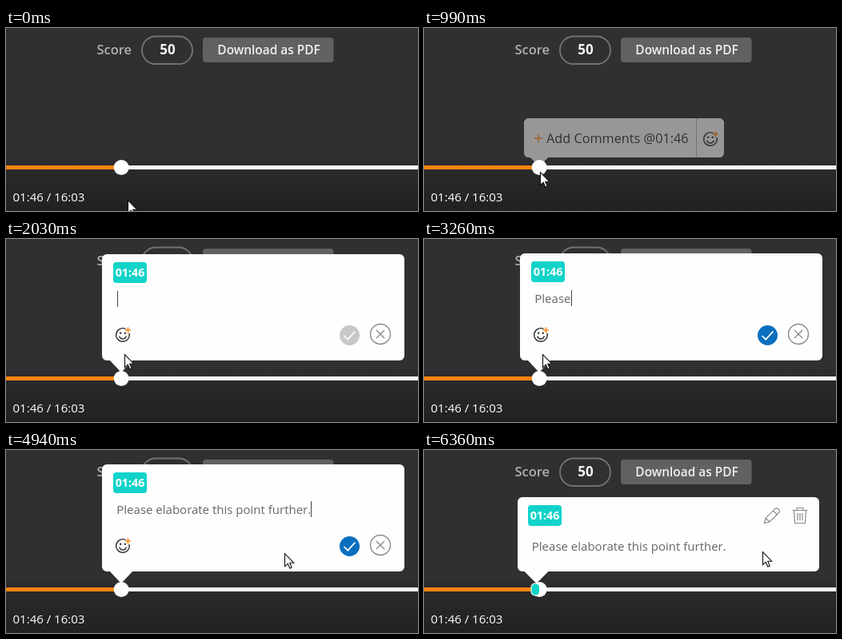
Animation of 515 by 229 pixels, one loop 6.44 s. Source, as an HTML page with a canvas:

```html
<!DOCTYPE html>
<html lang="en">
<head>
<meta charset="utf-8">
<title>Timed comment</title>
<style>
  html, body { margin: 0; height: 100%; overflow: hidden; background: #312f30; }
  canvas { display: block; }
</style>
</head>
<body>
<canvas width="515" height="229"></canvas>
<script>
const ctx = document.querySelector('canvas').getContext('2d');
const LOOP = 6440;
const OPEN = 1960, TYPE = 3020, HOVER = 5160, FOCUS = 5540, SAVE = 5770;
const MESSAGE = 'Please elaborate this point further.';
const ORANGE = '#ff8412', TEAL = '#12d3c9', PAPER = '#fefefe', GREY = '#8a8a8a';

const ARROW = new Path2D('M.5.5V16.6L4.2 13.1 6.8 19 9.2 18 6.7 12.2H11.7Z');
const HAND = new Path2D('M6 15V2.4a1.7 1.7 0 0 1 3.4 0V8.5q2-1 3 .7 2-.6 2.8.9 2-.3 2.3 1.6V16q0 3-2 5v2.5H7.5V21L2 14.5q-1-2 .8-2.5 1.6 0 3.2 3Z');

const progress = (t, from, to) => Math.min(1, Math.max(0, (t - from) / (to - from)));

function ease(t, from, to) {
  const p = progress(t, from, to);
  return p * p * (3 - 2 * p);
}

function box(x, y, w, h, r, fill) {
  ctx.beginPath();
  ctx.roundRect(x, y, w, h, r);
  ctx.fillStyle = fill;
  ctx.fill();
}

function disc(x, y, r, fill) {
  box(x - r, y - r, 2 * r, 2 * r, r, fill);
}

function outline(x, y, w, h, r, color, width) {
  ctx.beginPath();
  ctx.roundRect(x, y, w, h, r);
  ctx.strokeStyle = color;
  ctx.lineWidth = width;
  ctx.stroke();
}

// Strokes an SVG path placed at x, y
function line(d, x, y, color, width = 1.2) {
  ctx.save();
  ctx.translate(x, y);
  ctx.strokeStyle = color;
  ctx.lineWidth = width;
  ctx.stroke(new Path2D(d));
  ctx.restore();
}

function text(s, x, y, size, color, weight = 400, align = 'left') {
  ctx.font = `${weight} ${size}px "Open Sans", sans-serif`;
  ctx.textAlign = align;
  ctx.fillStyle = color;
  ctx.fillText(s, x, y);
}

// Rounded panel with a tail that points at tipX, tipY
function bubble(x, y, w, h, tipX, tipY, half, fill) {
  ctx.beginPath();
  ctx.roundRect(x, y, w, h, 6);
  ctx.moveTo(tipX - half, y + h - 1);
  ctx.lineTo(tipX + half, y + h - 1);
  ctx.lineTo(tipX, tipY);
  ctx.closePath();
  ctx.fillStyle = fill;
  ctx.fill();
}

function smiley(x, y) {
  line('M3.5-7.5A8.3 8.3 0 1 0 8-2M-4.3 1.5A4.4 4.4 0 0 0 4.3 1.5', x, y, '#333', 1.4);
  for (const side of [-1, 1]) disc(x + side * 2.8, y - 2.3, 1.2, '#333');
  line('M0-3.5v7M-3.5 0h7', x + 6.5, y - 6, ORANGE, 1.6);
}

function badge(x, y) {
  box(x, y, 42, 26, 4, TEAL);
  text('01:46', x + 21, y + 18, 14.3, '#fff', 700, 'center');
}

function player() {
  ctx.fillStyle = '#312f30';
  ctx.fillRect(0, 0, 515, 229);
  const shade = ctx.createLinearGradient(0, 164, 0, 229);
  shade.addColorStop(0, '#2f2d2f');
  shade.addColorStop(0.2, '#2b2a2b');
  shade.addColorStop(1, '#212121');
  ctx.fillStyle = shade;
  ctx.fillRect(0, 164, 515, 65);

  text('Score', 113.5, 33, 16.5, '#b0afb0', 600);
  outline(170, 10.5, 63, 34.5, 17, '#747273', 1.8);
  text('50', 202, 33, 17, '#f2f2f2', 700, 'center');
  box(246, 12, 163.5, 31, 4, '#626162');
  text('Download as PDF', 328.5, 33.3, 15.4, '#f0f0f0', 600, 'center');

  box(0, 172, 515, 5, 0, '#fbf5fb');
  box(0, 172, 144, 5, 0, ORANGE);
  text('01:46 / 16:03', 8.5, 217, 15, '#fff', 500);
}

function tooltip(opacity) {
  const panel = fill => bubble(125, 113, 250, 49, 144, 173, 12, fill);
  panel('#f5f5f6');
  line('M-5 0h10M0-5v10', 143, 138, ORANGE, 1.3);
  text('Add Comments @01:46', 153, 144, 16.25, '#333');
  line('M0 0v49', 340.5, 113, '#a9acb8', 1);
  smiley(358, 139);
  // Fading the panel as one layer keeps its text dark
  panel(`rgba(49, 47, 48, ${1 - opacity})`);
}

function focusFrame() {
  ctx.setLineDash([4, 4]);
  for (const color of ['#4fc04f', '#b070b8']) {
    outline(413, 100, 33, 42, 0, color, 1.6);
    ctx.lineDashOffset = 4;
  }
  ctx.setLineDash([]);
  ctx.lineDashOffset = 0;
}

function editor(t) {
  const typing = t >= TYPE, top = typing ? 18 : 19;
  bubble(120, top, 378, 152 - top, 144, 167, 15, PAPER);
  badge(134, top + 10);

  const count = 13 * progress(t, 2970, 3560) + 23 * progress(t, 3600, 4210);
  const typed = MESSAGE.slice(0, typing ? Math.floor(count) : 0);
  text(typed, 138.3, 80, 15, '#666');
  line('M0 0v20', Math.round(138.6 + ctx.measureText(typed).width) + 0.5, top + 46, '#444', 1);

  smiley(146, 120);
  disc(429.5, 120.5, 12.5, typing ? '#0a6fbf' : '#c8c8c8');
  line('M-7 .5l4.7 4.7 9.3-10', 429.5, 120.5, '#fff', 1.7);
  outline(455.5, 106.5, 25, 25, 12.5, GREY, 1.4);
  line('M-5-5L5 5M5-5L-5 5', 468, 119, GREY, 1.4);
  if (t >= FOCUS) focusFrame();
}

function savedComment() {
  bubble(117, 59, 377, 93, 140.5, 167, 16, PAPER);
  badge(130, 69);
  text(MESSAGE, 134.8, 126, 15, '#666');
  line('M0 19l1.7-6.3 12-12q1.5-1.2 3 .2l1.8 1.8q1.2 1.4 0 2.8l-12 12ZM1.7 12.7l4.8 4.8M11 3.5l4.8 4.8', 425.5, 72.5, GREY);
  line('M-9.5 3h19M-4 3V0h8v3M-7.5 3l1 16h13l1-16', 470, 72.5, GREY);
  for (const slot of [-3, 0, 3]) line('M0 0v9', 470 + slot, 79, GREY);
}

function pointer(t) {
  const rise = ease(t, 0, 360), settle = ease(t, 610, 770), leave = ease(t, 1440, 1720);
  const cross = ease(t, 4450, 5160), aim = ease(t, 5170, 5610), drift = progress(t, SAVE, 6360);
  const x = 152 - 7 * rise + 3 * leave + 258 * cross + 20 * aim - 3 * drift;
  const y = 215 - 31 * rise - 4 * settle - 36 * leave - 20 * cross + 3 * drift;
  const hand = t >= HOVER && t < SAVE, shape = hand ? HAND : ARROW;
  ctx.save();
  ctx.translate(Math.round(x) - (hand ? 6 : 0), Math.round(y));
  ctx.fillStyle = '#fff';
  ctx.strokeStyle = '#111';
  ctx.lineWidth = 1.1;
  ctx.fill(shape);
  ctx.stroke(shape);
  ctx.restore();
  if (hand) line('M0 0v3.5M3 .8v2.7M6 1.6v2', Math.round(x) + 3.4, Math.round(y) + 9, '#111', 1.1);
}

function draw(t) {
  player();
  if (t >= SAVE) {
    savedComment();
  } else if (t >= OPEN) {
    ctx.globalAlpha = t < OPEN + 70 ? 0.6 : 1;
    editor(t);
    ctx.globalAlpha = 1;
  } else if (t >= 770) {
    tooltip(progress(t, 770, 1190));
  }
  disc(144.2, 174.5, 9.5, '#fff');
  if (t >= SAVE) {
    box(133.5, 166.5, 11.5, 16, 5, '#fff');
    box(134.5, 167.5, 9.5, 14, 4.5, TEAL);
  }
  pointer(t);
}

function frame() {
  draw(performance.now() % LOOP);
  requestAnimationFrame(frame);
}
frame();
</script>
</body>
</html>
```
